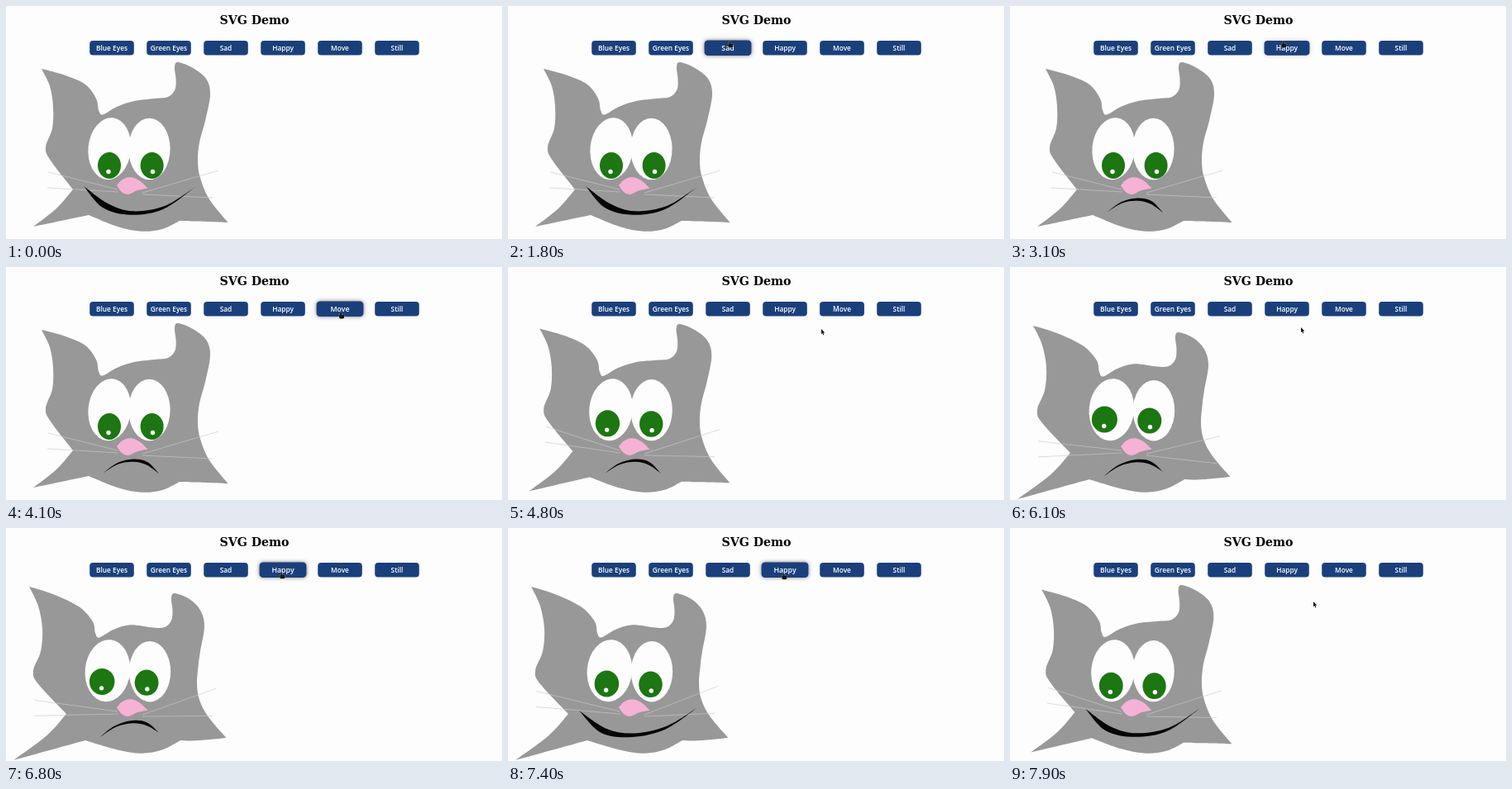
An HTML page with a canvas that plays this animation: 600x282 px, repeating every 8000 ms.

```html
<!DOCTYPE html>
<html lang="en">
<head>
<meta charset="utf-8">
<title>SVG Demo</title>
<style>
html, body { margin: 0; width: 100%; height: 100%; overflow: hidden; background: #fefdfe; }
canvas { display: block; width: 600px; height: 282px; }
</style>
</head>
<body>
<canvas id="stage"></canvas>
<script>
const LOOP = 8000;
const MOVE_AT = 4200;
const canvas = document.getElementById('stage');
const ctx = canvas.getContext('2d');
const ratio = Math.max(1, window.devicePixelRatio || 1);
canvas.width = 600 * ratio;
canvas.height = 282 * ratio;

const labels = ['Blue Eyes', 'Green Eyes', 'Sad', 'Happy', 'Move', 'Still'];

// Head outline: smooth sections, each ending in a corner where the next begins.
const head = [
  [[43, 76], [72, 84], [96, 95], [109, 112], [112, 126], [117, 131.5], [134, 122],
    [155, 115], [180, 112], [196, 110], [204.5, 101], [205.5, 88], [204, 74], [208, 68],
    [226, 75], [242, 88], [247, 107], [241, 139], [234, 165], [232, 188], [235, 208],
    [246, 234], [268.5, 262]],
  [[268.5, 262], [228, 260.5], [210, 260]],
  [[210, 260], [189, 270], [164, 272.7], [135, 267], [100, 253]],
  [[100, 253], [33, 267]],
  [[33, 267], [61, 245], [81, 222]],
  [[81, 222], [54, 187], [48, 171], [56, 148], [57, 122], [53, 97], [43, 76]]
];
const smile = [
  [[94, 218], [123, 239], [153, 248.3], [192, 242], [229, 219]],
  [[229, 219], [190, 246], [151, 252.8], [117, 244], [94, 218]]
];
const frown = [
  [[118, 249], [135, 237], [154, 232.5], [171, 236], [185, 250]],
  [[185, 250], [170, 239.5], [154, 235.8], [136, 238.5], [118, 249]]
];
const nose = [
  [[134, 217], [141, 210], [150, 207.3], [161, 211], [171.5, 220.5]],
  [[171.5, 220.5], [158, 223.5], [148, 228], [140, 225], [134, 217]]
];

// Handles that drag the nearby part of the face: x, y, dx, dy.
const handles = [
  [43, 76, -15, -5], [115, 130, -4, 1], [210, 72, -4, 11], [247, 107, -7, 12],
  [232, 188, -1, 0], [268, 262, -2, -8], [210, 260, 1, -3], [164, 273, 0, 0],
  [100, 253, -4, 4], [33, 267, -24, 14], [81, 222, -8, 3], [48, 171, -15, 2],
  [55, 122, -13, 0]
];

// Cursor stops: time, x, y.
const route = [[100, 604, 150], [1700, 267, 43], [2800, 267, 44], [3100, 329, 43],
  [3800, 404, 56], [4550, 403, 54], [4800, 379, 75], [6100, 352, 73], [6600, 332, 54],
  [7400, 332, 55], [7900, 367, 89]];

// Button index, time of entry, time of leaving.
const hovers = [[2, 1500, 2820], [3, 3000, 3250], [4, 3800, 4570], [3, 6480, 7450]];

const mix = (a, b, k) => a + (b - a) * k;
const clamp = v => Math.min(1, Math.max(0, v));
const smooth = v => { v = clamp(v); return v * v * (3 - 2 * v); };
const pulse = (t, up, upLen, down, downLen) =>
  smooth((t - up) / upLen) - smooth((t - down) / downLen);

function warp([x, y], p) {
  let sum = 0, dx = 0, dy = 0;
  for (const [hx, hy, mx, my] of handles) {
    const w = 1 / ((x - hx) ** 2 + (y - hy) ** 2 + 1) ** 2;
    sum += w;
    dx += w * mx;
    dy += w * my;
  }
  const k = x > 150 ? p * p : p;   // the right side follows late
  return [x + k * dx / sum, y + k * dy / sum];
}

const warpShape = (shape, p) => shape.map(part => part.map(pt => warp(pt, p)));
const blendShape = (a, b, k) => a.map((part, i) =>
  part.map(([x, y], j) => [mix(x, b[i][j][0], k), mix(y, b[i][j][1], k)]));

// Catmull-Rom curve through each section.
function fillShape(shape, color) {
  ctx.fillStyle = color;
  ctx.beginPath();
  ctx.moveTo(...shape[0][0]);
  for (const pts of shape) {
    for (let i = 0; i < pts.length - 1; i++) {
      const a = pts[i], b = pts[i + 1];
      const before = pts[i - 1] || a, after = pts[i + 2] || b;
      ctx.bezierCurveTo(
        a[0] + (b[0] - before[0]) / 6, a[1] + (b[1] - before[1]) / 6,
        b[0] - (after[0] - a[0]) / 6, b[1] - (after[1] - a[1]) / 6, b[0], b[1]);
    }
  }
  ctx.closePath();
  ctx.fill();
}

function oval(x, y, rx, ry, color, tilt = 0) {
  ctx.fillStyle = color;
  ctx.beginPath();
  ctx.ellipse(x, y, rx, ry, tilt, 0, Math.PI * 2);
  ctx.fill();
}

function write(text, x, y, font, color) {
  ctx.font = font;
  ctx.fillStyle = color;
  ctx.textAlign = 'center';
  ctx.fillText(text, x, y);
}

function hoverOf(button, t) {
  return hovers.reduce((most, [i, enter, leave]) => i !== button ? most :
    Math.max(most, Math.min(clamp((t - enter) / 250), clamp((leave + 250 - t) / 250))), 0);
}

function drawButton(label, i, t) {
  const hover = hoverOf(i, t);
  const scale = 1 + .06 * hover;
  ctx.save();
  ctx.translate(128 + 69 * i, 50.8);
  ctx.scale(scale, scale);
  ctx.save();
  ctx.shadowColor = `rgba(60, 50, 40, ${.65 * hover})`;
  ctx.shadowBlur = 5 * ratio;
  ctx.fillStyle = '#1a407c';
  ctx.beginPath();
  ctx.roundRect(-26.8, -8.7, 53.6, 17.4, 4);
  ctx.fill();
  ctx.restore();
  write(label, 0, 2.8, '600 8.3px "Open Sans", "Noto Sans", sans-serif', '#fff');
  ctx.restore();
}

function drawEyes(p, e) {
  const white = '#fefdfe', green = '#1c7611';
  oval(mix(125.3, 122.9, p), 172.7, mix(25.8, 27.2, p), 37.6, white, .1);
  oval(mix(173.4, 174, p), mix(173, 173.7, p), 25.2, mix(37.3, 36.7, p), white);
  oval(mix(125, 114.4, e), mix(193, 184.5, e), mix(14, 15.5, e), 16, green);
  oval(mix(176.6, 168.8, e), mix(193, 186, e), mix(14, 14.5, e), mix(16, 15.5, e), green);
  oval(mix(124, 113.8, e), mix(200.5, 192.5, e), 2.7, 2.7, white);
  oval(mix(177.5, 169.5, e), mix(200.5, 193.8, e), 2.7, 2.7, white);
}

function drawWhiskers(t, p) {
  const phase = (t - 4800) / 3100 * Math.PI * 2;
  const ramp = clamp((t - MOVE_AT) / 500);
  const left = ramp * (1.5 - 9.5 * Math.cos(phase));
  const right = ramp * 8 * Math.sin(phase - .3);
  const line = (x, y, farX, farY) => {
    ctx.moveTo(x, y);
    ctx.lineTo(farX, farY);
  };
  ctx.strokeStyle = '#cbc9ca';
  ctx.lineWidth = .65;
  ctx.beginPath();
  line(135, 222, 51 - 17 * p, 201 + left);
  line(136, 225, 50 - 16 * p, 220 + left);
  line(165, 226, 257 - 3 * p, 199 + right);
  line(165, 228, 250, 232 + right);
  ctx.stroke();
}

function drawCat(t) {
  const p = pulse(t, MOVE_AT, 1600, 7400, 800);
  const e = pulse(t, MOVE_AT, 1330, 6100, 2700);
  const sad = pulse(t, 2250, 300, 6800, 300);
  fillShape(warpShape(head, p), '#999899');
  drawEyes(p, e);
  drawWhiskers(t, p);
  fillShape(nose, '#f5b2d5');
  fillShape(warpShape(blendShape(smile, frown, sad), p), '#050505');
}

function cursorAt(t) {
  const i = route.findIndex(stop => stop[0] > t);
  if (i < 0) return route[route.length - 1].slice(1);
  const a = route[i - 1], b = route[i];
  const k = smooth((t - a[0]) / (b[0] - a[0]));
  return [mix(a[1], b[1], k), mix(a[2], b[2], k)];
}

function drawCursor(t) {
  if (t < route[0][0]) return;
  const [x, y] = cursorAt(t);
  const onButton = y < 60 && x > 101 && (x - 101) % 69 < 54;
  ctx.save();
  ctx.translate(x, y);
  ctx.beginPath();
  if (onButton) {
    ctx.roundRect(.6, -.6, 1.7, 5, .8);
    ctx.roundRect(-.6, 2.4, 6, 4.8, 1.4);
  } else {
    ctx.scale(.88, .88);
    [[0, 0], [0, 7], [1.5, 5.7], [2.7, 8.4], [3.8, 7.9], [2.7, 5.3], [4.8, 5.1]]
      .forEach(point => ctx.lineTo(...point));
    ctx.closePath();
  }
  ctx.strokeStyle = 'rgba(255, 255, 255, .55)';
  ctx.stroke();
  ctx.fillStyle = '#151515';
  ctx.fill();
  ctx.restore();
}

function draw(t) {
  ctx.setTransform(ratio, 0, 0, ratio, 0, 0);
  ctx.lineWidth = 1;
  ctx.fillStyle = '#fefdfe';
  ctx.fillRect(0, 0, 600, 282);
  write('SVG Demo', 300.5, 22, 'bold 14.2px "DejaVu Serif", "Noto Serif", serif', '#050505');
  labels.forEach((label, i) => drawButton(label, i, t));
  drawCat(t);
  drawCursor(t);
}

const start = performance.now();
function tick() {
  draw((performance.now() - start) % LOOP);
  requestAnimationFrame(tick);
}
tick();
</script>
</body>
</html>
```
